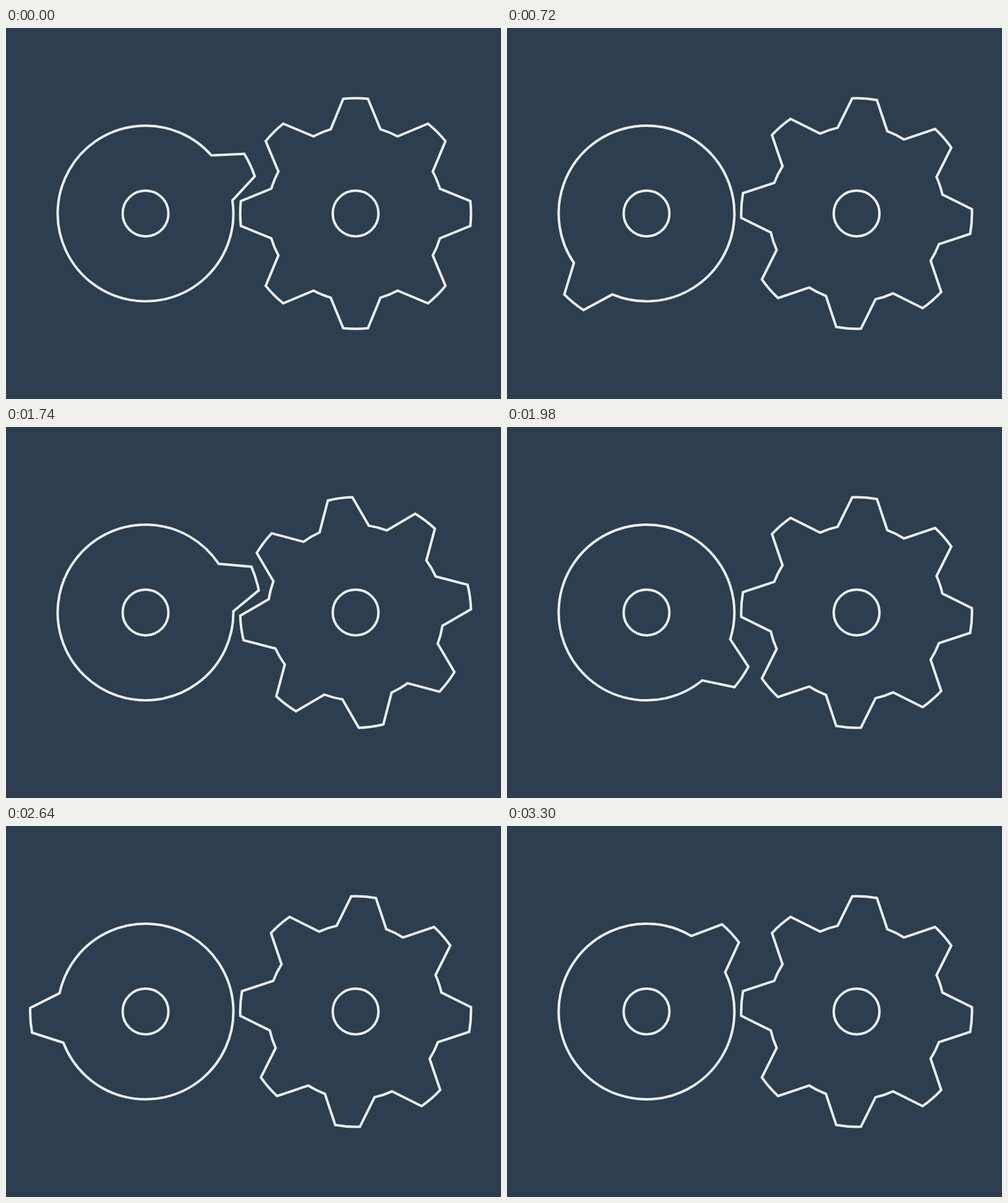
Recreate the animation shown at these times as an HTML page. Size 800 by 600 pixels, loop 3360 ms.

```html
<!DOCTYPE html>
<html lang="en">
<head>
<meta charset="utf-8">
<title>Intermittent gears</title>
<style>
  html, body { margin: 0; width: 100%; height: 100%; overflow: hidden; background: #2c3e50; }
  svg { display: block; width: 100%; height: 100%; }
  svg * { fill: none; stroke: #eee; stroke-width: 4; }
</style>
</head>
<body>
<svg viewBox="0 0 800 600">
  <g transform="translate(225.5 300)"><path id="driver"/><circle r="37"/></g>
  <g transform="translate(565 300)"><path id="wheel"/><circle r="37"/></g>
</svg>
<script>
  const ROOT = 142, TIP = 186.5;            // radii
  const ROOT_HALF = 16.45, TIP_HALF = 6.15; // half widths of a tooth, degrees
  const STEP = 60, STEPS_PER_TURN = 28, TURNS = 2;
  const PHASE = [-25, -30.1];               // driver angle at the start of each turn
  const ENGAGE = -29, PITCH = 45, REST = 4;

  const driver = document.getElementById('driver');
  const wheel = document.getElementById('wheel');

  function point(r, deg) {
    const a = deg * Math.PI / 180;
    return (r * Math.cos(a)).toFixed(3) + ' ' + (r * Math.sin(a)).toFixed(3);
  }

  // Teeth joined by root arcs, the first one pointing right.
  function gearPath(teeth) {
    const pitch = 360 / teeth;
    const large = pitch - 2 * ROOT_HALF > 180 ? 1 : 0;
    let d = 'M' + point(ROOT, -ROOT_HALF);
    for (let i = 0; i < teeth; i++) {
      const mid = i * pitch;
      d += 'L' + point(TIP, mid - TIP_HALF)
        + `A${TIP} ${TIP} 0 0 1 ` + point(TIP, mid + TIP_HALF)
        + 'L' + point(ROOT, mid + ROOT_HALF)
        + `A${ROOT} ${ROOT} 0 ${large} 1 ` + point(ROOT, mid + pitch - ROOT_HALF);
    }
    return d + 'Z';
  }

  function draw(ms) {
    const step = Math.floor(ms / STEP) % (STEPS_PER_TURN * TURNS);
    const turn = Math.floor(step / STEPS_PER_TURN);
    const angle = PHASE[turn] + (step % STEPS_PER_TURN) * 360 / STEPS_PER_TURN;
    const push = Math.min(Math.max(angle - ENGAGE, 0), PITCH);
    driver.setAttribute('transform', `rotate(${angle})`);
    wheel.setAttribute('transform', `rotate(${REST - push})`);
  }

  driver.setAttribute('d', gearPath(1));
  wheel.setAttribute('d', gearPath(8));

  const start = performance.now();
  function tick() {
    draw(performance.now() - start);
    requestAnimationFrame(tick);
  }
  tick();
</script>
</body>
</html>
```
